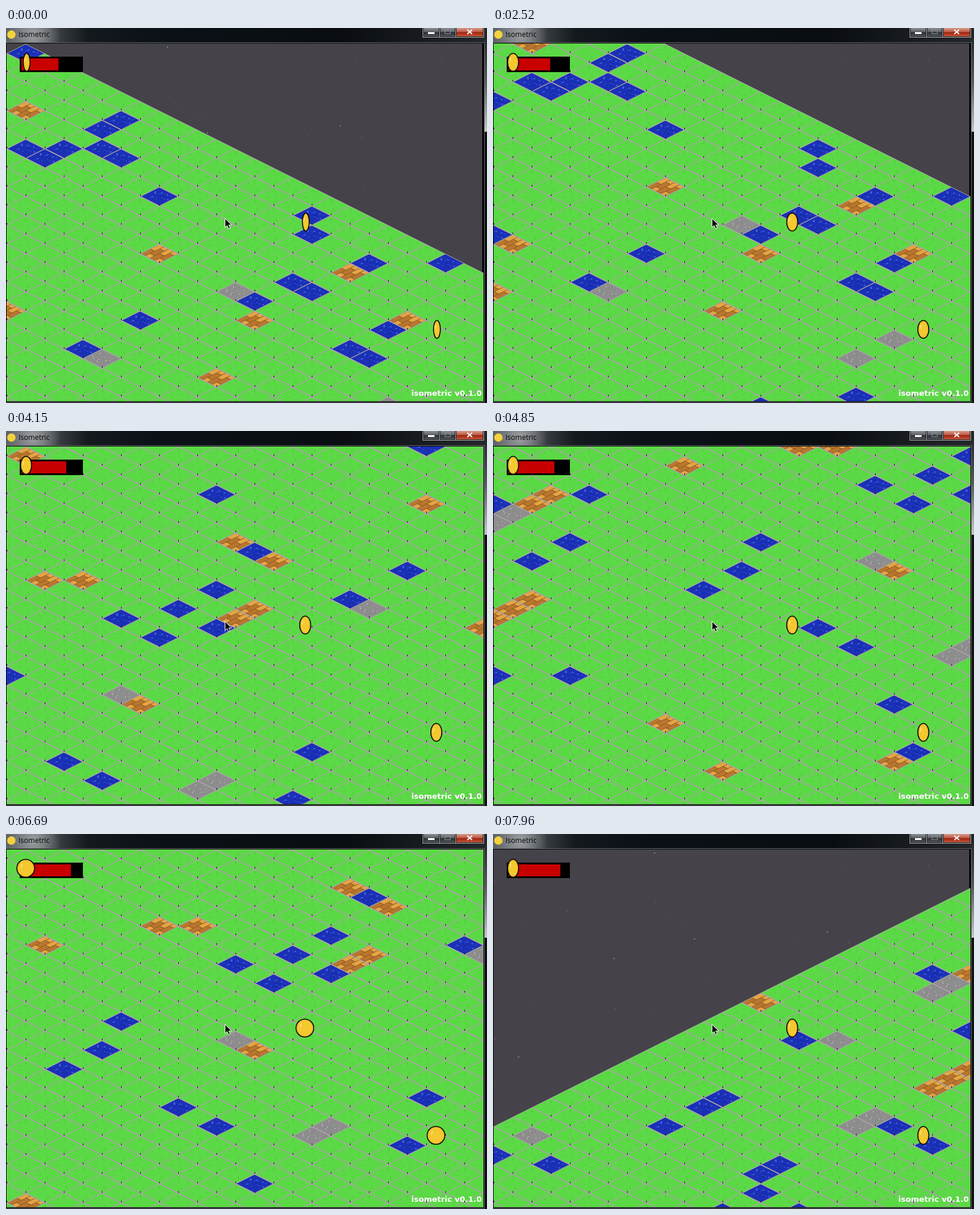
An HTML page with a canvas that plays this animation: 807x629 px, repeating every 8 s.

```html
<!DOCTYPE html>
<html>
<head>
<meta charset="utf-8">
<title>Isometric</title>
<style>
  html, body { margin: 0; width: 100%; height: 100%; overflow: hidden; background: #000; }
  canvas { display: block; }
</style>
</head>
<body>
<canvas id="stage" width="807" height="629"></canvas>
<script>
const LOOP = 8000;
const REFRESH = 142;
const COIN_TURN = 85;
const ctx = document.getElementById('stage').getContext('2d');

// Camera path: [time, a, b], where a and b count tiles along the two map axes.
const path = [[0, 0, 0], [1050, 0, 0], [2520, -3, -4], [3420, -1, -11], [3860, -1, -11], [4150, -1, -15],
  [4850, -1, -29], [4980, -1, -29], [6270, -1, -18], [6690, -1, -21], [7260, 5, -34], [7960, 14, -37]];

// Landmarks: [column, row, run]; positive runs climb to the right, negative ones fall.
const landmarks = {
  water: [[0, 10], [4, 8, 2], [4, 10, -2], [7, 15], [14, 24, -2], [18, 22], [6, 28], [3, 31], [17, 31, -2],
    [19, 29], [-4, 30], [-6, 32], [-9, 33], [-7, 35], [-15, 39], [-25, 39], [-29, 35], [-18, 44], [-29, 53],
    [-38, 56, 2], [-41, 49, 2]],
  stone: [[11, 25], [4, 32], [-9, 41], [-5, 51, 2], [-29, 37, 2], [-33, 51, 2]],
  brick: [[7, 21], [17, 23], [12, 28], [10, 34], [-11, 29], [-3, 33], [-27, 35, 2], [-29, 47, 3], [-38, 38]]
};

function random(seed) {
  return () => (seed = (seed * 16807) % 2147483647) / 2147483647;
}

function layer(w, h, draw) {
  const c = document.createElement('canvas');
  c.width = w;
  c.height = h;
  draw(c.getContext('2d'));
  return c;
}

function rect(g, color, x, y, w, h) {
  g.fillStyle = color;
  g.fillRect(x, y, w, h);
}

function gradient(g, x1, y1, stops) {
  const fill = g.createLinearGradient(0, 0, x1, y1);
  stops.forEach(([at, color]) => fill.addColorStop(at, color));
  return fill;
}

function polygon(g, color, points) {
  g.fillStyle = color;
  g.beginPath();
  points.forEach(p => g.lineTo(...p));
  g.closePath();
  g.fill();
}

function specks(g, seed, count, w, h, colors) {
  const rnd = random(seed);
  for (let n = 0; n < count; n++) {
    const i = 0.1 + 0.8 * rnd(), j = 0.1 + 0.8 * rnd();
    rect(g, colors[n % colors.length], Math.round(32 + (i - j) * 30), Math.round((i + j) * 15), w, h);
  }
}

function bricks(g) {
  const iso = (i, j) => [32 + (i - j) * 32, (i + j) * 15.5];
  const slab = (color, i, j, di, dj) =>
    polygon(g, color, [iso(i, j), iso(i + di, j), iso(i + di, j + dj), iso(i, j + dj)]);
  for (let row = 0; row < 4; row++) {
    for (let n = -1; n < 3; n++) {
      const i = row / 4 + 0.02, j = n * 0.5 + (row % 2) * 0.25;
      slab('#8f581f', i, j, 0.25, 0.5);
      slab((row + n) % 2 ? '#b9762f' : '#e3a545', i, j, 0.22, 0.46);
    }
  }
}

function tile(color, texture) {
  return layer(64, 31, g => {
    rect(g, color, 0, 0, 64, 31);
    texture(g);
    for (let y = 0; y < 31; y++) {
      const w = 2 * (16 - Math.abs(15 - y)), upper = y < 16;
      g.clearRect(0, y, 32 - w, 1);
      g.clearRect(32 + w, y, 32 - w, 1);
      rect(g, upper ? '#a0a69c' : '#a9a1a7', 32 - w, y, 2, 1);
      rect(g, upper ? '#a9a1a7' : '#a9a1a788', 30 + w, y, 2, 1);
    }
    rect(g, '#101810', 32, 28, 1, 3);
  });
}

const sprites = {
  grass: tile('#5cd946', g => specks(g, 19, 10, 3, 1, ['#4fc43b', '#54cd40'])),
  water: tile('#1a30b6', g => specks(g, 71, 18, 3, 2, ['#3f5edb', '#162aa6', '#2742c8'])),
  stone: tile('#8d8d8d', g => specks(g, 43, 18, 2, 2, ['#b0b0b0', '#848484', '#9b9b9b'])),
  brick: tile('#b9762f', bricks)
};

const placed = new Map();
for (const kind in landmarks) {
  for (const [col, row, run = 1] of landmarks[kind]) {
    for (let i = 0; i < Math.abs(run); i++) placed.set([col + i, row - i * Math.sign(run)].join(), kind);
  }
}

function tileAt(col, row) {
  const kind = placed.get(col + ',' + row);
  if (kind) return sprites[kind];
  const n = Math.abs(Math.sin(col * 12.9898 + row * 78.233) * 43758.5453) % 1;
  return n < 0.018 ? sprites.water : n < 0.024 ? sprites.stone : n < 0.03 ? sprites.brick : sprites.grass;
}

function drawButtons(g) {
  const shade = colors => gradient(g, 0, 15, colors.map((c, i) => [[0, 0.45, 0.5, 1][i], c]));
  const face = shade(['#8b8f93', '#5b5f63', '#2c3034', '#555a5f']);
  const red = shade(['#d69a8c', '#bd5541', '#9c2411', '#cf6040']);
  [[699, 28, face], [727, 27, face], [754, 47, red]].forEach(([x, w, fill]) => {
    rect(g, '#b4b7ba', x, 0, w + 1, 16);
    rect(g, '#17191b', x + 1, 0, w - 1, 15);
    rect(g, fill, x + 2, 0, w - 3, 14);
  });
  rect(g, '#fff', 708, 7, 11, 3);
  g.lineWidth = 1;
  g.strokeStyle = '#8c9196';
  g.strokeRect(736.5, 3.5, 9, 6);
  g.strokeStyle = '#fff';
  g.lineWidth = 2;
  g.beginPath();
  g.moveTo(774, 3); g.lineTo(782, 10);
  g.moveTo(782, 3); g.lineTo(774, 10);
  g.stroke();
}

const backdrop = layer(807, 629, g => {
  rect(g, '#101113', 0, 0, 807, 629);
  rect(g, gradient(g, 807, 0, [[0, '#5e6266'], [0.08, '#4a4e52'], [0.17, '#14191e'], [0.3, '#0b1117'],
    [0.7, '#090d11'], [1, '#24272a']]), 0, 0, 807, 25);
  const glow = g.createRadialGradient(46, 11, 4, 46, 11, 46);
  glow.addColorStop(0, '#b6babdb0');
  glow.addColorStop(1, '#b6babd00');
  rect(g, glow, 0, 0, 100, 25);
  g.fillStyle = '#f4d23c';
  g.beginPath();
  g.arc(9, 11, 7, 0, 7);
  g.fill();
  g.fillStyle = '#000';
  g.font = '12px "Open Sans", "Noto Sans", sans-serif';
  g.fillText('Isometric', 21, 15);
  drawButtons(g);

  rect(g, gradient(g, 0, 174, [[0, '#1c1e20'], [0.5, '#55585a'], [1, '#c4c6c8']]), 803, 16, 4, 158);
  rect(g, '#000', 0, 25, 802, 602);
  g.lineWidth = 1;
  g.strokeStyle = '#6c6e71';
  g.strokeRect(0.5, 24.5, 802, 603);
  rect(g, '#000', 0, 25, 802, 602);
  rect(g, '#454349', 1, 26, 798, 600);
  const rnd = random(5);
  for (let n = 0; n < 130; n++) {
    rect(g, n % 6 ? '#514f55' : '#85838a', 1 + Math.floor(rnd() * 796), 26 + Math.floor(rnd() * 598), 1, 1);
  }
  [[270, 31], [337, 175], [560, 163], [202, 208], [42, 373]].forEach(([x, y]) => rect(g, '#85838a', x, y, 2, 2));
});

function drawGround(a, b) {
  const du = a - b, dv = a + b;
  for (let v = -2; v < 38; v++) {
    for (let u = -1; u < 26; u++) {
      const col = u - du, row = v - dv;
      if ((col + row) % 2 || row < Math.abs(col)) continue;
      ctx.drawImage(tileAt(col, row), 1 + 32 * u, 27 + 16 * v);
    }
  }
}

function drawCoin(x, y, turn) {
  const [rx, shift] = [[5.8, 1], [9.3, 0], [14.9, -0.6], [9.3, 0]][turn];
  const ring = (inset, color, width) => {
    ctx.beginPath();
    ctx.ellipse(x + shift, y, rx - inset, 15 - inset, 0, 0, 7);
    ctx.strokeStyle = color;
    ctx.lineWidth = width;
    ctx.stroke();
  };
  ctx.beginPath();
  ctx.ellipse(x + shift, y, rx, 15, 0, 0, 7);
  ctx.fillStyle = '#f4c92f';
  ctx.fill();
  ring(1.6, '#e3ae2a', 1);
  ring(0, '#000', 1.5);
  const glint = x + shift + rx * (turn === 3 ? 0.35 : -0.42);
  ctx.strokeStyle = '#fbe88c';
  ctx.beginPath();
  ctx.moveTo(glint, y - 8);
  ctx.lineTo(glint - 1, y - 1);
  ctx.stroke();
}

function drawCursor(x, y) {
  const arrow = [[0, 0], [0, 15], [3.5, 11.8], [6, 17], [8.6, 15.8], [6.2, 10.8], [11, 10.8]];
  polygon(ctx, '#000', arrow.map(p => [x + p[0], y + p[1]]));
  ctx.lineWidth = 1;
  ctx.strokeStyle = '#fff';
  ctx.stroke();
}

// The picture only refreshes at even steps inside each stretch of the path.
function sample(t) {
  const next = path.findIndex(key => key[0] > t);
  if (next < 0) return path[path.length - 1];
  const from = path[next - 1], to = path[next];
  const steps = Math.round((to[0] - from[0]) / REFRESH);
  const p = Math.floor((t - from[0]) / (to[0] - from[0]) * steps) / steps;
  return from.map((value, i) => Math.round(value + (to[i] - value) * p));
}

function draw(t) {
  const [now, a, b] = sample(t);
  ctx.drawImage(backdrop, 0, 0);
  ctx.save();
  ctx.beginPath();
  ctx.rect(1, 26, 800, 600);
  ctx.clip();
  drawGround(a, b);
  rect(ctx, '#000', 23, 48, 106, 26);
  rect(ctx, '#c80000', 26, 51, Math.round(62 + 25 * now / LOOP), 20);
  const turn = Math.floor((now + 20) / COIN_TURN) % 4;
  [[33.7, 57.5], [502, 325.5], [722, 505.5]].forEach(([x, y]) => drawCoin(x, y, turn));
  ctx.fillStyle = '#fff';
  ctx.font = 'bold 13px "DejaVu Sans", sans-serif';
  ctx.fillText('isometric v0.1.0', 680, 617);
  ctx.restore();
  drawCursor(367.5, 319.5);
}

const start = performance.now();
function frame() {
  draw((performance.now() - start) % LOOP);
  requestAnimationFrame(frame);
}
frame();
</script>
</body>
</html>
```
